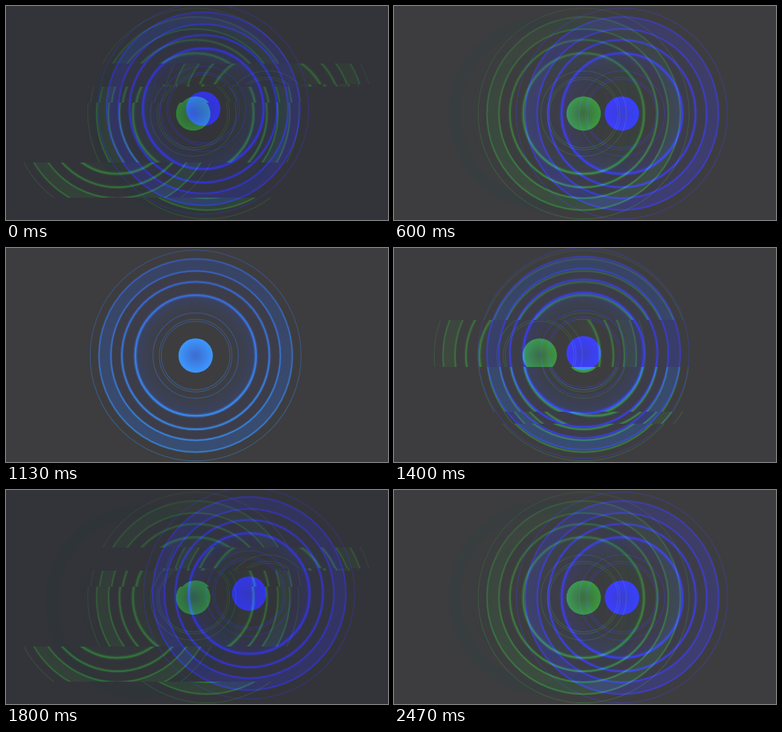
Write an HTML page with a canvas that moves like this. It is 478 px wide and 268 px high and loops after 2.59 s.

```html
<!DOCTYPE html>
<html lang="en">
<head>
<meta charset="utf-8">
<title>Glitch rings</title>
<style>
html, body { margin: 0; width: 100%; height: 100%; overflow: hidden; background: #3d3d3f; }
canvas { display: block; width: 478px; height: 268px; }
</style>
</head>
<body>
<canvas id="stage"></canvas>
<script>
const W = 478, H = 268, CX = 237.3, CY = 134.7;
const LOOP = 2590, STEP = 200 / 3;
const BAND_OUTER = 121, BAND_INNER = 106, MIDDLE = 92.3, GLOW = 75.5, CORE = 21.5;
const canvas = document.getElementById('stage');
const ratio = window.devicePixelRatio || 1;
canvas.width = W * ratio;
canvas.height = H * ratio;
const ctx = canvas.getContext('2d');

// Each channel only touches its own colour component; pairs run top/bottom or inner/outer.
const CHANNELS = {
  red: { blend: 'darken', color: v => `rgb(${v},255,255)`,
    line: [57, 56], band: [56, 56], tint: 60, glow: 58, core: [61, 60] },
  green: { blend: 'lighten', color: v => `rgb(0,${v},0)`,
    line: [100, 146], band: [67, 77], tint: 61, glow: 66, core: [112, 152] },
  blue: { blend: 'lighten', color: v => `rgb(0,0,${v})`,
    line: [215, 248], band: [100, 114], tint: 73, glow: 96, core: [212, 255] }
};

const lerp = (a, b, p) => a + (b - a) * p;

function blendStops(gradient, from, to) {
  gradient.addColorStop(0, from);
  gradient.addColorStop(1, to);
  return gradient;
}

function disc(r, fill, hole = 0) {
  ctx.beginPath();
  ctx.arc(0, 0, r, 0, 7);
  if (hole) {
    ctx.moveTo(hole, 0);
    ctx.arc(0, 0, hole, 0, 7);
  }
  ctx.fillStyle = fill;
  ctx.fill('evenodd');
}

function drawRings({ color, line, band, tint, glow, core }) {
  const vertical = ([top, bottom]) => blendStops(
    ctx.createLinearGradient(0, -BAND_OUTER, 0, BAND_OUTER), color(top), color(bottom));
  const radial = (r0, r1, from, to) =>
    blendStops(ctx.createRadialGradient(0, 0, r0, 0, 0, r1), from, to);
  const clear = color(glow).replace('rgb', 'rgba').replace(')', ',0)');

  disc(BAND_OUTER, vertical(band), BAND_INNER);
  disc(BAND_INNER, color(tint), GLOW);
  disc(GLOW, radial(46, GLOW, clear, color(glow)), 46);
  disc(CORE, radial(3, CORE, color(core[0]), color(core[1])));

  ctx.strokeStyle = vertical(line);
  const ring = (r, width, alpha) => {
    ctx.globalAlpha = alpha;
    ctx.lineWidth = width;
    ctx.beginPath();
    ctx.arc(0, 0, r, 0, 7);
    ctx.stroke();
  };
  const softRing = (r, width, alpha) => {
    ring(r, width * 2.2, alpha * 0.3);
    ring(r, width, alpha);
  };
  for (const r of [43, 45.5, 53.5, 132]) ring(r, 0.9, 0.45);
  softRing(BAND_OUTER, 1.3, 0.7);
  softRing(BAND_INNER, 1.4, 0.8);
  softRing(MIDDLE, 1.9, 0.85);
  softRing(GLOW, 2.3, 0.95);
}

function drawStrip(ch, y0, y1, dx, dy) {
  if (y1 <= y0) return;
  ctx.save();
  ctx.beginPath();
  ctx.rect(0, y0, W, y1 - y0);
  ctx.clip();
  ctx.translate(CX + dx, CY + dy);
  ctx.globalCompositeOperation = ch.blend;
  drawRings(ch);
  ctx.restore();
}

function drawChannel(ch, [dx, dy], slices) {
  let y = 0;
  for (const [y0, y1, shift] of slices) {
    drawStrip(ch, y, y0, dx, dy);
    drawStrip(ch, y0, y1, dx + shift, dy);
    y = y1;
  }
  drawStrip(ch, y, H, dx, dy);
}

// Slices: top, bottom, horizontal shift
const TEARS = [[72, 98, 90], [98, 101, 76], [121, 196, -3], [196, 240, -98], [240, 268, 14]];
const BELT = [[90, 149, -55], [205, 220, 12]];
const SHREDS = [
  [28, 42, -14], [56, 62, -37], [68, 107, 30], [118, 123, -31],
  [165, 184, 14], [184, 191, -30], [225, 235, -46]
];

// Wide shreds, each followed by up to four thin strips that alternate sides.
function shredSlices(strength) {
  return SHREDS.flatMap(([y0, y1, shift], i) => {
    const limit = Math.min(y1 + 20, SHREDS[i + 1]?.[0] ?? y1);
    const slices = [[y0, y1, shift * strength]];
    for (let y = y1, side = 8; y < limit; y += 5, side = 5 - side) {
      slices.push([y, Math.min(y + 5, limit), side * strength]);
    }
    return slices;
  });
}

const clean = () => ({});
const split = x => ({ blue: [x, 0], red: [-x, 0] });
const shred = n => ({ all: shredSlices(Math.cos(n * 2)) });
const torn = (x, y, dark) => ({ blue: [x, y], red: [-x, -y], green: TEARS, dark });
const belt = () => ({ blue: [0, -3], green: BELT });

// Scenes: first step, last moving step, pose for progress p and step n
const SCENES = [
  [0, 2, p => torn(lerp(9.5, -14, p), lerp(-6, 4, p), 1 - p / 2)],
  [3, 5, (p, n) => shred(n - 5)],
  [6, 8, clean],
  [9, 16, p => split(75 * Math.sin(Math.PI * lerp(0.22, 1, p)))],
  [17, 17, clean],
  [18, 20, (p, n) => shred(n - 19)],
  [21, 23, belt],
  [24, 27, p => torn(lerp(8, 67, p), lerp(-3, -5, p), lerp(0.25, 1, p))],
  [30, 30, () => torn(34, -3, 0)],
  [31, 32, (p, n) => shred(n - 31)],
  [33, 35, clean],
  [36, 37, p => split(lerp(24, 48, p))]
];

function poseAt(time) {
  const step = Math.floor((time + 4) / STEP);
  const [first, last, pose] = SCENES.findLast(scene => scene[0] <= step);
  const n = Math.min(step, last);
  return pose((n - first) / Math.max(1, last - first), n);
}

function draw(time) {
  const { all = [], green = all, blue = [0, 0], red = [0, 0], dark = 0 } = poseAt(time);
  ctx.setTransform(ratio, 0, 0, ratio, 0, 0);
  ctx.fillStyle = '#3d3d3f';
  ctx.fillRect(0, 0, W, H);
  drawChannel(CHANNELS.red, red, all);
  drawChannel(CHANNELS.green, [0, 0], green);
  drawChannel(CHANNELS.blue, blue, all);

  ctx.globalCompositeOperation = 'multiply';
  ctx.globalAlpha = dark;
  ctx.fillStyle = 'rgb(213,217,231)';
  ctx.fillRect(0, 0, W, H);
  ctx.globalAlpha = 1;
  ctx.globalCompositeOperation = 'source-over';
}

const begin = performance.now();
function tick() {
  draw((performance.now() - begin) % LOOP);
  requestAnimationFrame(tick);
}
tick();
</script>
</body>
</html>
```
